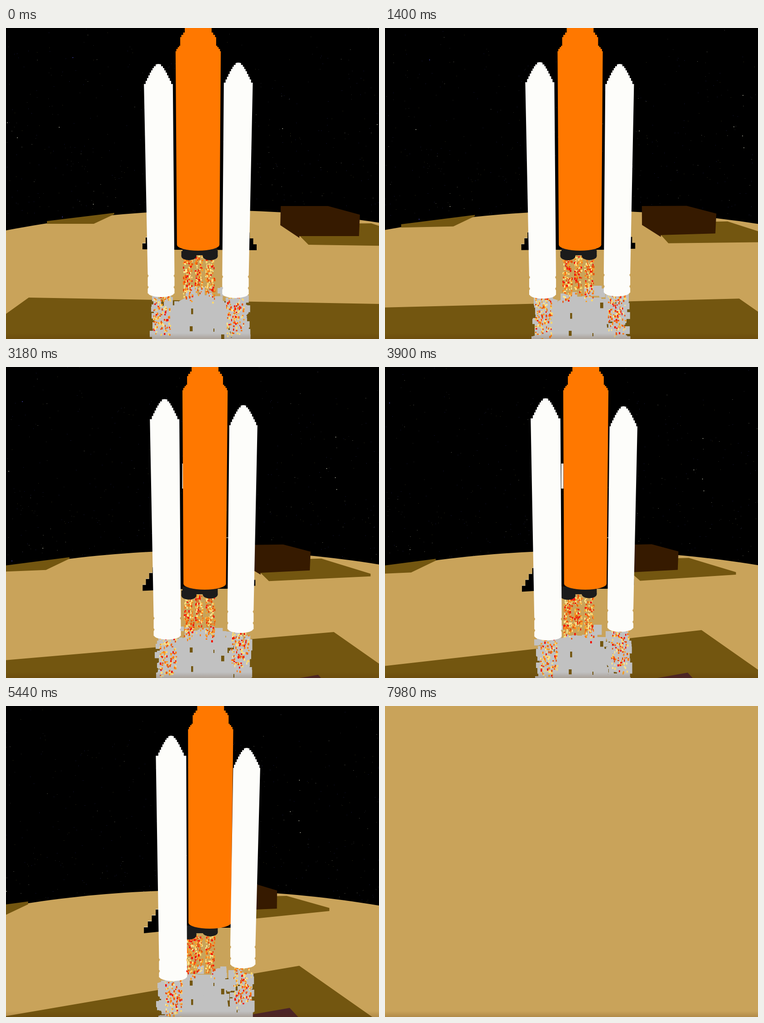
Animation of 820x683 px, one loop 8 s. Source, as an HTML page with a canvas:

```html
<!DOCTYPE html>
<html lang="en">
<head>
<meta charset="utf-8">
<title>Rocket launch</title>
<style>
html, body { margin: 0; width: 100%; height: 100%; overflow: hidden; background: #000; }
canvas { display: block; width: 820px; height: 683px; }
</style>
</head>
<body>
<canvas id="stage" width="820" height="683"></canvas>
<script>
const W = 820, H = 683, LOOP = 8000, CUT = 127;
const TAN = '#c9a35a', BROWN = '#735610', DARK = '#361a00', SMOKE = '#c1c1c1';
const WHITE = '#fdfdfa', ORANGE = '#ff7800', ENGINE = '#1b1b1b';
const FIRE = ['#f31208', '#ff7a12', '#ffe58c', '#f7a12b', '#e8540c', '#f9d873'];
const c = document.getElementById('stage').getContext('2d');

let n = 0;

function rng(seed) {
  return () => {
    seed = (seed + 0x6D2B79F5) | 0;
    let t = Math.imul(seed ^ (seed >>> 15), 1 | seed);
    t = (t + Math.imul(t ^ (t >>> 7), 61 | t)) ^ t;
    return ((t ^ (t >>> 14)) >>> 0) / 4294967296;
  };
}

// Quadratic through the values at steps 0, 54 and 99.
function q(a, b, d) {
  return a * (n - 54) * (n - 99) / 5346 - b * n * (n - 99) / 2430 + d * n * (n - 54) / 4455;
}
const pt = (x0, x1, x2, y0, y1, y2) => [q(x0, x1, x2), q(y0, y1, y2)];

function poly(color, pts) {
  c.fillStyle = color;
  c.beginPath();
  pts.forEach(p => c.lineTo(p[0], p[1]));
  c.fill();
}
function rect(color, x, y, w, h) {
  c.fillStyle = color;
  c.fillRect(x, y, w, h);
}
function ellipse(color, x, y, rx, ry) {
  c.fillStyle = color;
  c.beginPath();
  c.ellipse(x, y, rx, ry, 0, 0, Math.PI * 2);
  c.fill();
}
// Half widths [hw, y, centre] mirrored to a closed outline.
function lathe(color, rows) {
  const right = rows.map(([w, y, x]) => [x + w, y]);
  const left = rows.map(([w, y, x]) => [x - w, y]).reverse();
  poly(color, right.concat(left));
}
// Steps [hw, top] of a blocky nose, down to the given end.
function stairs(steps, end, x, y = 0) {
  return steps.flatMap(([w, top], i) => {
    const low = i + 1 < steps.length ? steps[i + 1][1] : end;
    return [[w, y + top, x], [w, y + low, x]];
  });
}

function sky() {
  rect('#000', 0, 0, W, H);
  const r = rng(11);
  const tints = ['#1b1b48', '#30302c', '#3a371c', '#26262b', '#22224f'];
  for (let i = 0; i < 620; i++) {
    const x = r() * 1060 - 1.65 * n, y = 425 * Math.pow(r(), 0.65) + 0.17 * n - 15;
    const big = r() > 0.9;
    rect(big ? '#44443c' : tints[i % 5], Math.round(x), Math.round(y), big ? 2 : 1, 1);
  }
  const bright = [[191, 386], [146, 64], [116, 217], [24, 240], [2, 207], [607, 220],
    [123, 414], [815, 211], [834, 231], [837, 257], [835, 142]];
  bright.forEach(([x, y], i) =>
    rect(i % 5 == 1 ? '#30307c' : '#77776c', Math.round(x - 1.65 * n), Math.round(y + 0.17 * n), 2, 2));
}

function ground() {
  const mid = 460 - 0.36 * n, base = 400.5 + 0.037 * n, rim = [];
  for (let x = 0; x <= W; x += 20) rim.push([x, base + 0.000208 * (x - mid) ** 2]);
  poly(TAN, [...rim, [W, H], [0, H]]);

  poly(BROWN, [pt(90, -10, -100, 424, 437, 449), pt(238, 161, 82, 406, 415, 425),
    pt(238, 161, 82, 409, 418, 430), pt(193, 111, 25, 430, 442, 457), pt(90, -10, -100, 430, 446, 463)]);

  poly(BROWN, [pt(645, 576, 520, 456, 453, 450), pt(650, 580, 525, 430, 425, 421),
    pt(803, 714, 643, 429, 422, 418), pt(930, 826, 742, 470, 457, 447),
    pt(930, 826, 742, 480, 463, 453), pt(665, 593, 545, 476, 471, 469)]);
  poly(DARK, [pt(604, 534, 478, 391, 391, 391), pt(708, 628, 564, 391, 390, 389),
    pt(778, 690, 621, 410, 406, 405), pt(776, 688, 620, 457, 448, 445),
    pt(645, 576, 520, 457, 453, 450), pt(645, 576, 520, 461, 457, 454), pt(603, 535, 480, 433, 432, 431)]);

  const l = pt(50, -75, -200, 592, 638, 697), r = pt(826, 741, 671, 606, 586, 574);
  poly(BROWN, [l, r, [r[0] + 400, r[1] + 280], [W, 900], [-400, 900], [l[0] - 400, l[1] + 285]]);
  const a = pt(775, 703, 645, 700, 680, 667);
  poly('#4c2428', [a, [a[0] + 60, a[1] + 64], [a[0] - 250, a[1] + 44]]);
}

function orbiter() {
  const [lx, ly] = pt(300, 300, 302, 486, 490, 496);
  const [rx, ry] = pt(551, 549, 546, 488, 482, 477);
  const step = q(7, 7, 8), rs = q(7.5, 6, 4), pts = [[rx, ry], [lx, ly]];
  for (let i = 0; i < 8; i++) {
    const y = ly - 13 * (i + 1);
    pts.push([lx + step * i, y], [lx + step * (i + 1), y]);
    if (i < 5) rect('#eee8d0', lx + step * i, y - 1, step, 1);
  }
  for (let i = 7; i >= 0; i--) {
    const y = ry - 13 * (i + 1);
    pts.push([rx - rs * (i + 1), y], [rx - rs * i, y]);
  }
  poly('#000', pts);
  rect('#000', q(360, 365, 375), 330, 125, 157);
  rect(WHITE, 387.5, 212, 4.8, 55);
  rect('#a8a8a0', 484, 374, 8, 1.5);
}

function smoke() {
  const r = rng(77), lx = q(341, 350, 354), rx = q(511, 514, 518);
  poly(SMOKE, [[380, 600], [400, 590], [450, 590], [480, 600], [492, H], [356, H]]);
  function puff(x0, x1, y0, y1, count) {
    for (let i = 0; i < count; i++) {
      const w = 8 + r() * 13, h = 10 + r() * 16;
      const x = x0 + r() * (x1 - x0 - w), y = y0 + (r() * (y1 - y0) + n * (2 + r() * 3)) % (y1 - y0);
      rect(SMOKE, Math.round(x), Math.round(y), w, h);
    }
  }
  puff(lx - 25, lx + 34, q(586, 589, 594), H, 75);
  puff(rx - 32, rx + 27, q(586, 582, 578), H, 75);
  puff(368, 488, 566, 640, 46);
  puff(360, 496, 595, H, 75);
  for (let i = 0; i < 4; i++) {
    const x = 385 + r() * 95, y = 600 + (r() * 80 + n * 3) % 80;
    rect(BROWN, Math.round(x), Math.round(y), 2 + r() * 6, 4 + r() * 10);
  }
}

function flame(seed, x, half, y, len, count) {
  const r = rng(seed);
  for (let i = 0; i < count; i++) {
    const off = r() * 2 - 1, speed = 4 + r() * 4;
    const reach = len * (0.72 + r() * 0.28);
    const d = (r() * reach + n * speed) % reach;
    const w = 2 + r() * 2, h = 2.5 + r() * 3, color = FIRE[Math.floor(r() * 6)];
    rect(color, Math.round(x + off * half - 1.5), Math.round(y + d), w, h);
  }
}

function engines() {
  flame(1, q(400, 402, 404), 10, 504, 98, 135);
  flame(2, q(424, 425, 424), 8, 500, 88, 95);
  flame(3, 449, 10, 502, 100, 125);
  const ly = q(0, 0.5, 2), ry = q(0, -1, -3);
  rect(ENGINE, 388, 482, 76, 17);
  ellipse(ENGINE, 402, 501 + ly, 16.5, 9);
  ellipse(ENGINE, 449, 501 + ry, 16.5, 9);
  rect(ENGINE, 385.5, 490 + ly, 33, 11);
  rect(ENGINE, 432.5, 488 + ry, 33, 13);
}

function core() {
  const x = q(422.5, 434.5, 445.5), b = q(422.5, 434, 444);
  const nose = [[29.5, 0], [33, 10], [37, 15], [39.5, 20], [42, 39], [45, 42], [48, 46]];
  lathe(ORANGE, [...stairs(nose, 51, x), [49.7, 51, x], [46.7, 476, b]]);
  ellipse(ORANGE, b, 476, 46.7, 13);
}

function booster(seed, xt, wt, xb, wb, top, end) {
  flame(seed, xb + (seed == 4 ? 2 : 0), 19, end - 8, 98, 125);
  const nose = [[6, 0], [10, 4], [13, 8], [16, 13], [19, 18], [22, 24], [25, 30], [28, 36]];
  lathe(WHITE, [
    ...stairs(nose, 43, xt, top),
    [wt, top + 43, xt], [wb, end - 50, xb], [wb - 2, end - 47, xb], [wb, end - 43, xb],
    [wb, end - 25, xb], [wb - 2, end - 22, xb], [wb, end - 18, xb], [wb, end - 8, xb]]);
  ellipse(WHITE, xb, end - 9, wb - 1, 9);
  ellipse(WHITE, xt, top + 1, 6, 2);
}

function launch() {
  sky();
  ground();
  orbiter();
  smoke();
  engines();
  core();
  booster(4, q(335, 345.5, 357.5), q(31.8, 32.2, 33), q(341, 351.5, 362.5), q(29.4, 29.7, 30.4),
    q(80, 73, 68), q(591, 597, 602));
  booster(5, q(510.7, 519.8, 526.7), q(31.8, 31.2, 30.2), q(504.5, 513.8, 519.2), q(29.1, 28.9, 28.1),
    q(77, 83, 90), q(593, 586, 579));
}

// Two dark slabs part and uncover the sand.
function slabs() {
  const p = Math.max(0, Math.min(1, (n - 129) / 31)), e = 1 - (1 - p) ** 2;
  rect(BROWN, 0, 0, W, H);
  poly(e ? TAN : '#9a7a34', [[263 - 345 * e, 0], [264 + 558 * e, 0], [282 + 705 * e, H], [281 - 370 * e, H]]);
}

function shade() {
  const g = c.createLinearGradient(0, 670, 0, H);
  g.addColorStop(0, 'rgba(80,40,0,0)');
  g.addColorStop(1, 'rgba(80,40,0,0.2)');
  rect(g, 0, 670, W, 13);
}

// Steps are held for 100, 20 and 20 ms in turn.
function stepAt(t) {
  const r = t % 140;
  return 3 * Math.floor(t / 140) + (r < 100 ? 0 : r < 120 ? 1 : 2);
}

const start = performance.now();
function tick() {
  n = stepAt((performance.now() - start) % LOOP);
  if (n < CUT) launch(); else slabs();
  shade();
  requestAnimationFrame(tick);
}
tick();
</script>
</body>
</html>
```
